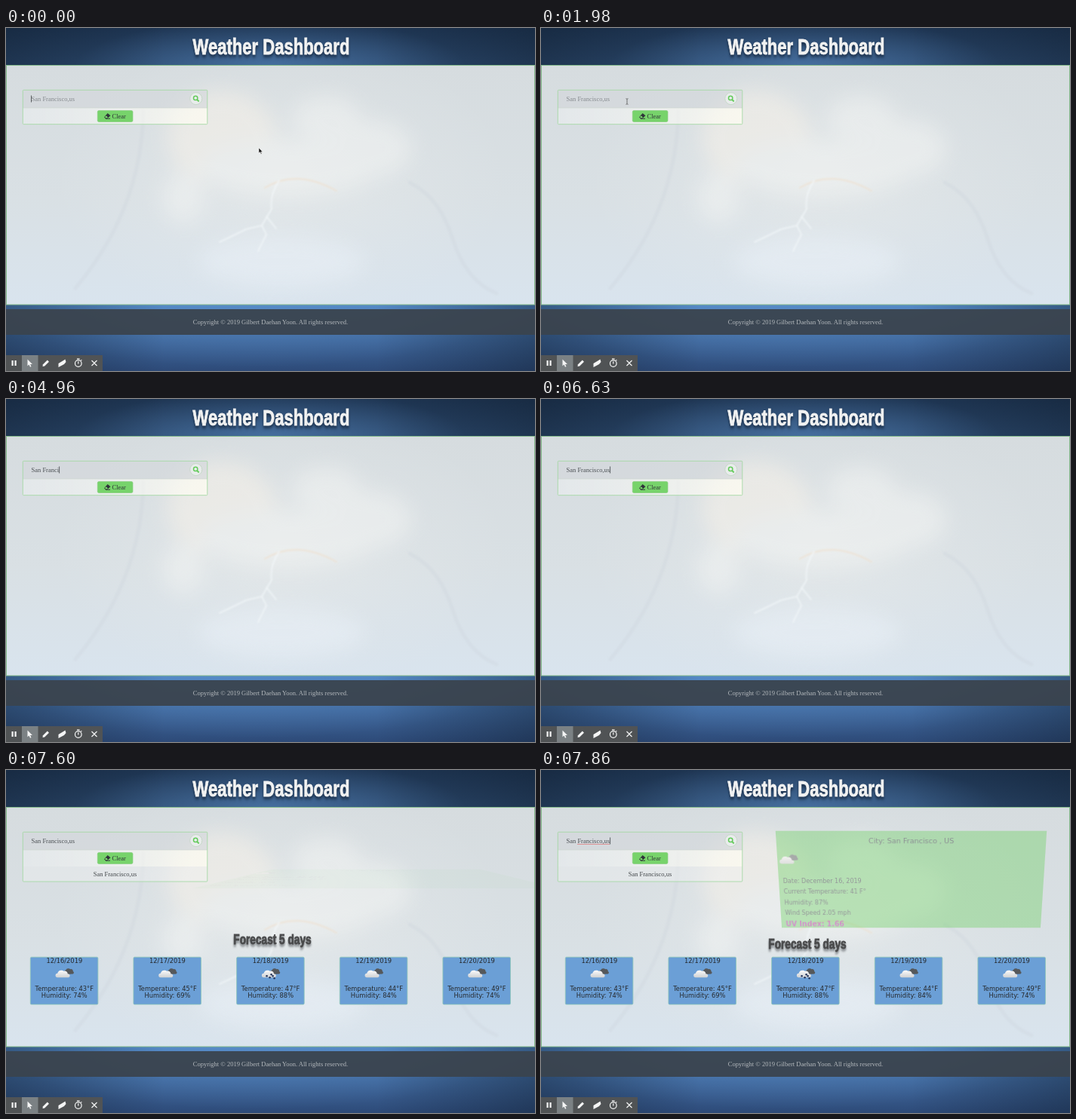
Write an HTML page that moves like this. It is 701x455 px and loops after 7990 ms.

```html
<!DOCTYPE html>
<html lang="en">
<head>
<meta charset="utf-8">
<title>Weather Dashboard</title>
<style>
  html, body { margin: 0; width: 100%; height: 100%; overflow: hidden; background: #2e4a78; }
  #stage { position: relative; width: 701px; height: 455px; overflow: hidden; }
  #stage > svg { position: absolute; left: 0; top: 0; display: block; }
  text { font: 8.5px "Liberation Serif", "Times New Roman", serif; white-space: pre; }
  .mid { text-anchor: middle; }
  .sans { font-family: "DejaVu Sans", Verdana, sans-serif; font-size: 8.3px; fill: #26292c; }
  .poster { font-family: "Liberation Sans", Arial, sans-serif; font-weight: bold; text-anchor: middle; stroke-width: .9; }
  #title { font-size: 29px; fill: #f1f2f2; stroke: #f1f2f2; filter: drop-shadow(0 3px 2px rgba(5, 15, 30, .65)); }
  #forecast { font-size: 18px; fill: #4a4b4c; stroke: #4a4b4c; filter: drop-shadow(0 3px 1.5px rgba(60, 65, 70, .6)); }
  #city { position: absolute; left: 315.3px; top: 81.8px; width: 351.4px; background: #74d06c; }
  #city svg { display: block; }
  #city .sans { font-size: 8px; }
  #city .place { font-size: 9.5px; }
  #city .uv { font-size: 9.6px; font-weight: bold; fill: #b0209c; }
</style>
</head>
<body>
<div id="stage">
<svg width="701" height="455" viewBox="0 0 701 455">
  <defs>
    <linearGradient id="sky" x2="0" y2="1">
      <stop offset="0" stop-color="#1e3552"/>
      <stop offset=".1" stop-color="#2a4669"/>
      <stop offset=".8" stop-color="#548bc9"/>
      <stop offset=".9" stop-color="#416a9f"/>
      <stop offset="1" stop-color="#2d4a78"/>
    </linearGradient>
    <radialGradient id="glow">
      <stop offset="0" stop-color="#5c8fc9" stop-opacity=".75"/>
      <stop offset="1" stop-color="#5c8fc9" stop-opacity="0"/>
    </radialGradient>
    <linearGradient id="sides">
      <stop offset="0" stop-color="#0f1d2e" stop-opacity=".42"/>
      <stop offset=".3" stop-color="#0f1d2e" stop-opacity="0"/>
      <stop offset=".7" stop-color="#0f1d2e" stop-opacity="0"/>
      <stop offset="1" stop-color="#0f1d2e" stop-opacity=".42"/>
    </linearGradient>
    <linearGradient id="haze" x2="0" y2="1">
      <stop offset="0" stop-color="#d6dcdf"/>
      <stop offset=".55" stop-color="#d9e0e4"/>
      <stop offset="1" stop-color="#d9e4ee"/>
    </linearGradient>
    <radialGradient id="light">
      <stop offset="0" stop-color="#eceeed" stop-opacity=".9"/>
      <stop offset="1" stop-color="#e6eaec" stop-opacity="0"/>
    </radialGradient>
    <linearGradient id="warm">
      <stop offset="0" stop-color="#fff" stop-opacity=".3"/>
      <stop offset="1" stop-color="#fffdf2" stop-opacity=".7"/>
    </linearGradient>
    <linearGradient id="puff" x2="0" y2="1">
      <stop offset="0" stop-color="#fbfbfb"/>
      <stop offset="1" stop-color="#cfd1d3"/>
    </linearGradient>
    <filter id="soft" x="-50%" y="-50%" width="200%" height="200%"><feGaussianBlur stdDeviation="13"/></filter>
    <filter id="fuzz"><feGaussianBlur stdDeviation=".8"/></filter>
    <clipPath id="inside"><rect y="50" width="701" height="317"/></clipPath>
    <symbol id="cloud" viewBox="-13 -10 26 20" width="26" height="20" x="-13" y="-10" overflow="visible">
      <path d="M0 0a3 3 0 0 1 2-4a4 4 0 0 1 6-1a2.600 2.600 0 0 1 3.500 3a1.700 1.700 0 0 1 0 3.200l-8 .5z" fill="#55585b"/>
      <path d="M-9 6a2.700 2.700 0 0 1 0-5.400a5 5 0 0 1 8-3a4 4 0 0 1 5.500 3.800a2.300 2.300 0 0 1 1 4.600z" fill="url(#puff)"/>
    </symbol>
  </defs>

  <rect width="701" height="455" fill="url(#sky)"/>
  <ellipse cx="350" cy="52" rx="260" ry="64" fill="url(#glow)" opacity=".75"/>
  <ellipse cx="330" cy="375" rx="330" ry="75" fill="url(#glow)" opacity=".6"/>
  <rect width="701" height="455" fill="url(#sides)"/>

  <g clip-path="url(#inside)">
    <rect y="49" width="701" height="318" fill="url(#haze)"/>
    <ellipse cx="365" cy="200" rx="300" ry="190" fill="url(#light)" opacity=".6"/>
    <g filter="url(#soft)" fill="#f3f4f3" opacity=".5">
      <ellipse cx="285" cy="145" rx="72" ry="62" fill="#f8f2e8"/>
      <ellipse cx="425" cy="120" rx="46" ry="30"/>
      <ellipse cx="485" cy="160" rx="52" ry="38"/>
      <ellipse cx="375" cy="185" rx="120" ry="38"/>
      <ellipse cx="235" cy="225" rx="28" ry="34"/>
      <ellipse cx="365" cy="310" rx="110" ry="34" fill="#eaf1f8"/>
    </g>
    <g fill="none" filter="url(#fuzz)" stroke-linecap="round">
      <path d="M343 212Q385 186 438 216" stroke="#f0dcc6" stroke-width="2" opacity=".6"/>
      <path d="M362 202Q349 222 352 240L339 262L345 274L334 296M339 262L318 267L283 284M345 250L358 266" stroke="#f4f8fb" stroke-width="1.600" opacity=".85"/>
      <path d="M182 110Q180 240 92 345M535 205Q575 225 592 280T650 352" stroke="#c8d0d6" stroke-width="5" opacity=".25"/>
    </g>
  </g>
  <rect x=".5" y="49.500" width="700" height="317.500" fill="none" stroke="#83b98a"/>
  <text id="title" class="poster" transform="translate(351.500 35) scale(.76 1)">Weather Dashboard</text>

  <rect y="373" width="701" height="34" fill="#3a444e" opacity=".95"/>
  <text class="mid" x="350.500" y="393" fill="#b4b9bd">Copyright © 2019 Gilbert Daehan Yoon. All rights reserved.</text>

  <rect x="22" y="82" width="245" height="24" fill="#d3d7da" opacity=".55"/>
  <rect x="22" y="106" width="245" height="22" fill="url(#warm)"/>
  <path d="M22 106H267" stroke="#cdd6d0" stroke-width=".7"/>
  <g id="history">
    <rect x="22" y="128" width="245" height="20" fill="#f2f4f3" opacity=".35"/>
    <text class="mid" x="144.500" y="140.500" fill="#45494c">San Francisco,us</text>
  </g>
  <rect id="form" x="22.300" y="82.300" width="244.500" height="45.400" rx="1" fill="none" stroke="#a5d8a5" stroke-width=".9"/>
  <text id="query" x="33.500" y="97"></text>
  <path id="caret" d="M0 89.500V98.500" stroke="#3c4043" stroke-width=".8"/>
  <path id="spell" d="M48.500 98.500H91" stroke="#e04848" stroke-width="1" stroke-dasharray="1 1"/>

  <circle cx="251.800" cy="93.600" r="8" fill="#e9ecec" stroke="#c3d6c4" stroke-width=".9"/>
  <g fill="none" stroke="#65cb5c" stroke-width="1.500">
    <circle cx="251.200" cy="92.900" r="2.700"/>
    <path d="M253.200 95L255.700 97.500" stroke-width="1.800"/>
  </g>
  <rect x="121.300" y="109.500" width="46.700" height="15" rx="1.800" fill="#77d36b" stroke="#8ccf85" stroke-width=".7"/>
  <g transform="translate(134 117)" stroke="#30363a" stroke-linejoin="round">
    <path d="M-3.500 1L1 -3.300L3.700 -.6L-.5 3H-2Z" fill="none"/>
    <path d="M-1.200 -1.200L1 -3.300L3.700 -.6L1.500 1.400Z" fill="#30363a"/>
    <path d="M-2 3.200H4"/>
  </g>
  <text x="140.500" y="120" fill="#2e3437">Clear</text>

  <g id="results">
    <text id="forecast" class="poster">Forecast 5 days</text>
    <g id="days"></g>
  </g>

  <rect y="434" width="128" height="21" fill="#505355"/>
  <rect x="21" y="434" width="21.500" height="21" fill="#7b8184"/>
  <g fill="#f4f5f5" stroke="#f4f5f5" stroke-width="0">
    <path d="M7.500 441h2.200v7h-2.200zM11.500 441h2.200v7h-2.200z"/>
    <path d="M28.500 439.500V448.300L30.500 446.500L32 449.800L33.500 449.100L32 446H35Z"/>
    <path d="M48.500 449L49 446.300L54.800 440.500L57 442.700L51.200 448.500Z"/>
    <path d="M69.500 445L78.500 439.500L79.500 443L77 446L69.500 450Z"/>
    <g fill="none" stroke-width="1.200">
      <circle cx="95.800" cy="445" r="4.300"/>
      <path d="M94 438.800H97.600M95.800 442.300V445.500M99.200 441.300L100.300 440.200M113.500 441L120.500 448M120.500 441L113.500 448"/>
    </g>
  </g>

  <path id="arrow" d="M0 0V7L1.700 5.500L2.900 8.200L4 7.700L2.900 5.200H5Z" fill="#151515" stroke="#fff" stroke-width=".5"/>
  <path id="beam" d="M-1.500 -3.800Q0 -3.800 0 -3Q0 -3.800 1.500 -3.800M0 -3V3M-1.500 3.800Q0 3.800 0 3Q0 3.800 1.500 3.800" fill="none" stroke="#555" stroke-width=".8"/>
</svg>
<div id="city">
  <svg width="351.400" height="128.800">
    <text class="sans place mid" x="175.700" y="16">City: San Francisco , US</text>
    <use href="#cloud" x="14.500" y="36.500"/>
    <g id="facts"></g>
    <text id="uv" class="sans uv" x="5.700" y="127">UV Index: 1.66</text>
  </svg>
</div>
</div>
<script>
const LOOP = 7990, FLIP_START = 7495;
const $ = id => document.getElementById(id);
const show = (id, on) => { $(id).style.display = on ? "" : "none"; };
const QUERY = "San Francisco,us";

// Each list holds [start time, values...] and keeps its value until the next entry.
const at = (list, t) => list.filter(e => e[0] <= t).pop();
const ticks = [7470, 7600, 7730, 7860].map(t => [t]);
const typed = [[0, 0], [2180, 1], [2630, 2], [2860, 3], [3040, 4], [3180, 5], [3630, 6], [3830, 7],
  [4460, 8], [4960, 10], [5140, 11], [5290, 12], [5790, 13], [5940, 14], [6300, 15], [6630, 16]];
const mouse = [[0, 335, 159], [100, 262, 148], [170, 198, 134.5], [360, 170, 126], [490, 142, 115], [620, 127, 108.5],
  [770, 121, 90], [900, 114, 85], [1020, 110, 89], [1150, 112, 95], [1270, 114, 97.5]];
const caretOn = [[0, 1], [100, 0], [620, 1], [770, 0], [1270, 1], [1980, 0], [2180, 1], [7320, 0], [7860, 1]];
const headingY = [[0, 215], [7320, 219], [7470, 225], [7600, 231], [7730, 235], [7860, 237]];

const days = [[43, 74], [45, 69], [47, 88], [44, 84], [49, 74]];
const drops = [[-5, 4], [-1, 6], [3, 4], [5, 7], [1, 2]]
  .map(([x, y]) => `<circle cx="${x}" cy="${y}" r="1.300" fill="#26365c"/>`).join("");
$("days").innerHTML = days.map(([temp, wet], i) => `
  <g transform="translate(${32.3 + i * 136.65} 248.200)">
    <rect width="89.600" height="62.800" rx="1.500" fill="#6b9fd6" stroke="#8fc7b8" stroke-width=".8"/>
    <g class="detail">
      <text class="sans mid" x="45" y="8">12/${16 + i}/2019</text>
      <g transform="translate(45 21)"><use href="#cloud"/>${i === 2 ? drops : ""}</g>
      <text class="sans mid" x="45" y="44.500">Temperature: ${temp}°F</text>
      <text class="sans mid" x="45" y="53.700">Humidity: ${wet}%</text>
    </g>
  </g>`).join("");
$("facts").innerHTML = ["Date: December 16, 2019", "Current Temperature: 41 F°", "Humidity: 87%", "Wind Speed 2.05 mph"]
  .map((line, i) => `<text class="sans" x="5.700" y="${68 + i * 14.3}">${line}</text>`).join("");
const details = document.querySelectorAll(".detail");

function easeIn(x) {
  if (x <= 0) return 0;
  if (x >= 1) return 1;
  let lo = 0, hi = 1;
  for (let i = 0; i < 24; i++) {
    const u = (lo + hi) / 2, v = 1 - u;
    if (1.26 * v * v * u + 3 * v * u * u + u * u * u < x) lo = u; else hi = u;
  }
  return lo * lo * (3 - 2 * lo);
}

function drawCity(t) {
  const tick = at(ticks, t);
  show("city", tick);
  if (!tick) return;
  const age = tick[0] - FLIP_START, full = t >= 7860;
  const angle = 90 - 110 * easeIn(age / 400);
  const city = $("city");
  city.style.height = (full ? 128.8 : 117.5) + "px";
  city.style.opacity = easeIn(age / 600);
  city.style.transform = `perspective(212px) rotateX(${angle}deg)`;
  show("uv", full);
}

function draw(t) {
  const count = at(typed, t)[1], query = $("query");
  query.textContent = count ? QUERY.slice(0, count) : QUERY;
  query.setAttribute("fill", count ? "#4b5054" : "#858a8e");
  const end = count ? query.getComputedTextLength() + .5 : 0;
  $("caret").setAttribute("transform", `translate(${33.5 + end} 0)`);
  show("caret", at(caretOn, t)[1]);
  show("spell", t >= 7860);

  const [, x, y] = at(mouse, t), overInput = t >= 770;
  show("arrow", !overInput);
  show("beam", overInput && t < 3180);
  $(overInput ? "beam" : "arrow").setAttribute("transform", `translate(${x} ${y})`);

  const found = t >= 6890;
  show("history", found);
  show("results", found);
  $("form").setAttribute("height", found ? 65.7 : 45.4);
  $("forecast").setAttribute("transform", `translate(353 ${at(headingY, t)[1]}) scale(.76 1)`);
  for (const d of details) d.style.display = t >= 7470 ? "" : "none";
  drawCity(t);
}

const start = performance.now();
function loop() {
  draw((performance.now() - start) % LOOP);
  requestAnimationFrame(loop);
}
loop();
</script>
</body>
</html>
```
